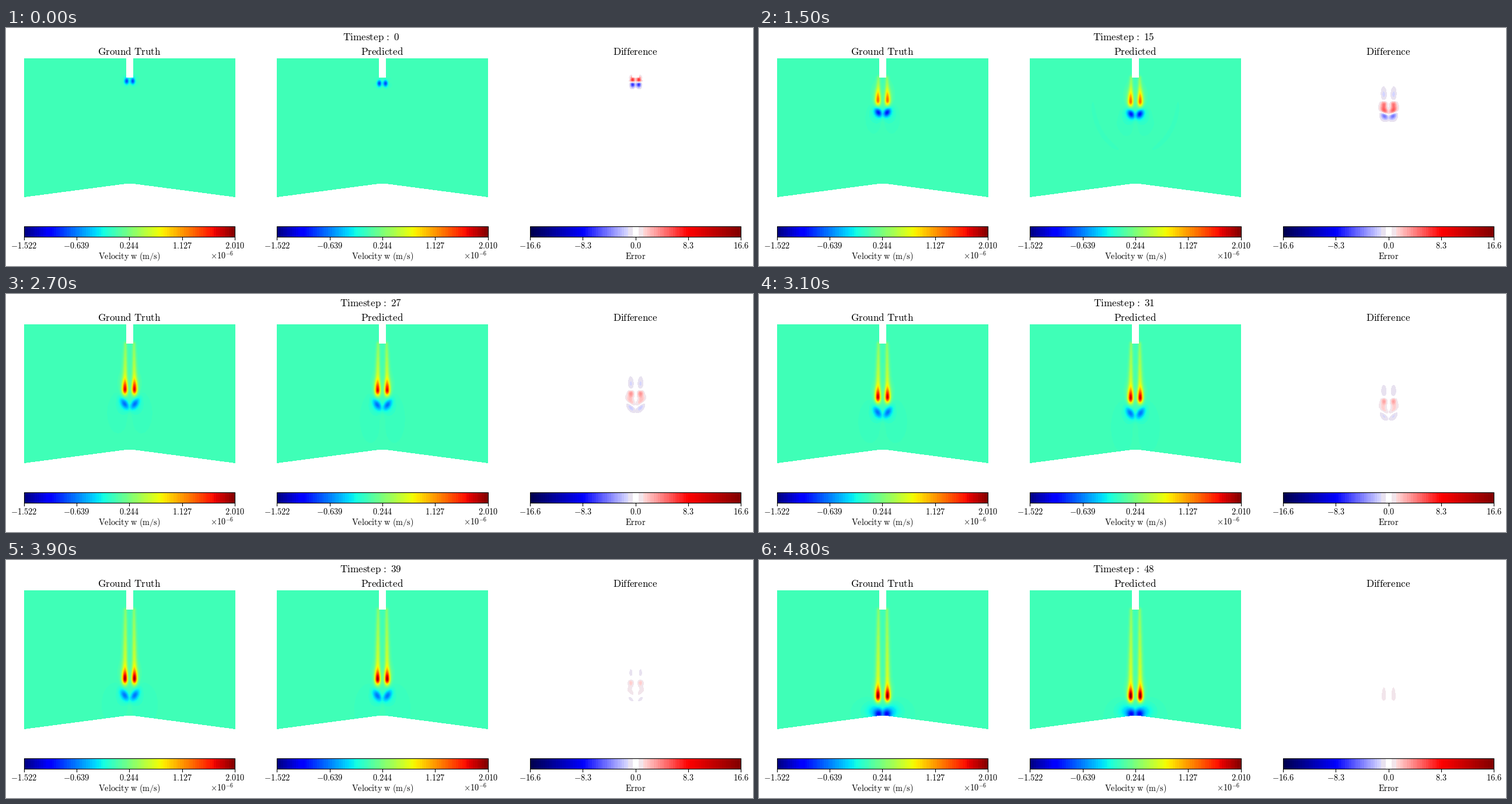
A matplotlib script that plays this animation: 1280 by 408 pixels, repeating every 4900 ms.

```python
import numpy as np
import matplotlib as mpl
import matplotlib.pyplot as plt
from matplotlib.animation import FuncAnimation
from matplotlib.patches import Rectangle

mpl.rcParams["mathtext.fontset"] = "cm"

W, H, DPI = 1280, 408, 100
STEPS, INTERVAL = 49, 100
VMIN, VMAX = -1.522, 2.010
EMAX = 16.6
ERROR_SCALE = 15
BANDS = 99
LEFT, PITCH, WIDTH = 30.6, 433.6, 361.5
TOP, BOTTOM = 52.4, 290
NOZZLE = 85.5

# Distance from the symmetry axis and height, in pixels
dist, y = np.meshgrid(np.abs(np.arange(361) - 180.0),
                      np.arange(52, BOTTOM) + 0.5)
floor = 267 + np.maximum(0, dist - 6) * 23 / 174.5
solid = (y > floor) | ((dist < 5.9) & (y < NOZZLE))


def ease(k, start, end):
    s = np.clip((k - start) / (end - start), 0, 1)
    return s * s * (3 - 2 * s)


def blob(cx, cy, sx, sy, tilt=0.0):
    dy = y - cy + tilt * (dist - cx)
    return np.exp(-((dist - cx) / sx) ** 2 / 2 - (dy / sy) ** 2 / 2)


def crescent(k, scale=1.0):
    """Wave front that spreads from the nozzle."""
    u = dist / (14 + 3.9 * k)
    v = (y - 85 - 2.6 * k) / (24 + 4.5 * k)
    angle = np.arctan2(v, u)
    return (np.exp(-((np.hypot(u, v) - scale) / 0.085) ** 2)
            * np.exp(-((angle - 0.6) / 0.75) ** 4))


def jet_stream(k, lag):
    """Fast core with a tapering trail back to the nozzle."""
    head = max(74 + 3.33 * k, 87) + 0.8 * lag
    peak = 0.1 + 1.95 * (1 - np.exp(-k / 17))
    s = np.clip((y - NOZZLE) / (head - NOZZLE), 0, 1)
    wide = (2.1 + 1.5 * s) * np.where(dist < 7.5, 0.85, 1)
    across = np.exp(-((dist - 6.7 - 0.8 * s) / wide) ** 2 / 2)
    ends = np.exp(-(np.maximum(y - head, 0) / 6) ** 2 / 2
                  - (np.maximum(NOZZLE - y, 0) / 2.5) ** 2 / 2)
    trail = min(peak, 0.7) * (0.4 + 0.6 * s) * across * ends
    tall = np.where(y < head, 10, 6.5)
    core = max(peak - 0.7, 0) * blob(7.6, head, 3.3, tall)
    skirt = 0.12 * min(k / 15, 1) * blob(10, head - 9, 5, 11)
    return trail + core + skirt


def front(k, lag, longer):
    """Slow lobes pushed ahead of the core, spreading at the floor."""
    nose = 90.5 + 3.62 * k + lag
    wall = ease(k, 41, 48)
    size = min(0.4 + 0.08 * k, 1)
    depth = 0.5 + 0.5 * np.exp(-((k - 9) / 10) ** 2) + 0.35 * wall
    tilt = np.clip(0.04 * (k - 6), 0, 0.7) * (1 - wall)
    lobes = depth * blob(min(5 + 0.12 * k, 8) - 2 * wall, nose,
                         min(2.9 + 0.1 * k, 5.4), min(4 + 0.05 * k, 5.6), tilt)
    side = (0.15 + 0.15 * wall) * blob(10 * size + 3 * wall, nose + 2 - 7 * wall,
                                       7 * size + 4 * wall, 9 * size)
    q2 = (((dist - 9 - 0.4 * k) / (9 + 0.48 * k)) ** 2
          + ((y - nose - min(0.8 * k, 16) * (1 - wall) - 8 * longer)
             / (min(13 + 1.05 * k, 44) - 10 * wall + 8 * longer)) ** 2)
    gap = 1 - np.exp(-(dist / 3.5) ** 2)
    return lobes + side + 0.033 * gap * np.exp(-q2 ** 3)


def flow(k, predicted):
    lag = 4 * (1 - k / (STEPS - 1)) if predicted else 0
    gain = 1 + 0.03 * ease(k, 40, 48) if predicted else 1
    longer = ease(k, 15, 23) if predicted else 0
    v = gain * jet_stream(k, lag) - front(k, lag, longer)
    if predicted:
        wave = ease(k, 0, 3) * (0.075 - 0.042 * ease(k, 8, 15)) * (1 - ease(k, 15, 20))
        return v - wave * crescent(k) - 0.4 * wave * crescent(k, 0.62)
    return v - 0.033 * ease(k, 0, 3) * (1 - ease(k, 8, 12)) * crescent(k)


def bands(name):
    return mpl.colormaps[name]((np.arange(BANDS) + 0.5) / BANDS)


SPEED = bands("jet")
ERROR = bands("seismic")
MID = BANDS // 2
ERROR[MID - 3:MID - 1, :3] = 0.91, 0.89, 0.945
ERROR[MID - 1:MID + 2, :3] = 1
ERROR[MID + 2:MID + 4, :3] = 0.95, 0.90, 0.925


def paint(values, lo, hi, colors):
    index = np.clip((values - lo) / (hi - lo) * BANDS, 0, BANDS - 1).astype(int)
    rgba = colors[index]
    rgba[solid] = 1
    return rgba


def render(k):
    truth, guess = flow(k, False), flow(k, True)
    error = ERROR_SCALE * (guess - truth)
    return (paint(truth, VMIN, VMAX, SPEED),
            paint(guess, VMIN, VMAX, SPEED),
            paint(error, -EMAX, EMAX, ERROR))


fig = plt.figure(figsize=(W / DPI, H / DPI), dpi=DPI, facecolor="white")
ax = fig.add_axes([0, 0, 1, 1])
ax.axis("off")


def label(x, base, body, size=10.3):
    return ax.text(x, base, f"${body}$", fontsize=size, color="black",
                   ha="center", va="baseline")


def roman(text):
    return r"\mathrm{" + text.replace(" ", r"\ ") + "}"


def show(pixels, x, top, bottom):
    return ax.imshow(pixels, extent=(x, x + WIDTH, bottom, top),
                     aspect="auto", interpolation="nearest")


def colorbar(x, colors, lo, hi, digits, name):
    show(colors[None], x, 340, 358)
    ax.add_patch(Rectangle((x, 340), WIDTH, 18, fill=False, ec="black", lw=0.8))
    for i, value in enumerate(np.linspace(lo, hi, 5)):
        tx = x + i * WIDTH / 4
        ax.plot([tx, tx], [358, 362.5], color="black", lw=0.8)
        label(tx, 377.5, f"{value:.{digits}f}")
    label(x + WIDTH / 2, 395.5, roman(name))


images = []
titles = ("Ground Truth", "Predicted", "Difference")
for i, (title, first) in enumerate(zip(titles, render(0))):
    x = LEFT + i * PITCH
    images.append(show(first, x, TOP, BOTTOM))
    label(x + WIDTH / 2, 46, roman(title), 12.35)
    if title == "Difference":
        colorbar(x, ERROR, -EMAX, EMAX, 1, "Error")
    else:
        colorbar(x, SPEED, VMIN, VMAX, 3, "Velocity w (m/s)")
        label(x + 340, 395.5, r"{\times}10^{-6}")
header = label(625, 21, "", 12.35)
ax.set_xlim(0, W)
ax.set_ylim(H, 0)


def update(k):
    for image, rgba in zip(images, render(k)):
        image.set_data(rgba)
    header.set_text(r"$\mathrm{Timestep}\hspace{0.12}:\hspace{0.33}%d$" % k)
    return [*images, header]


anim = FuncAnimation(fig, update, frames=STEPS, interval=INTERVAL,
                     repeat=True, repeat_delay=0, blit=False)
plt.show()
```
